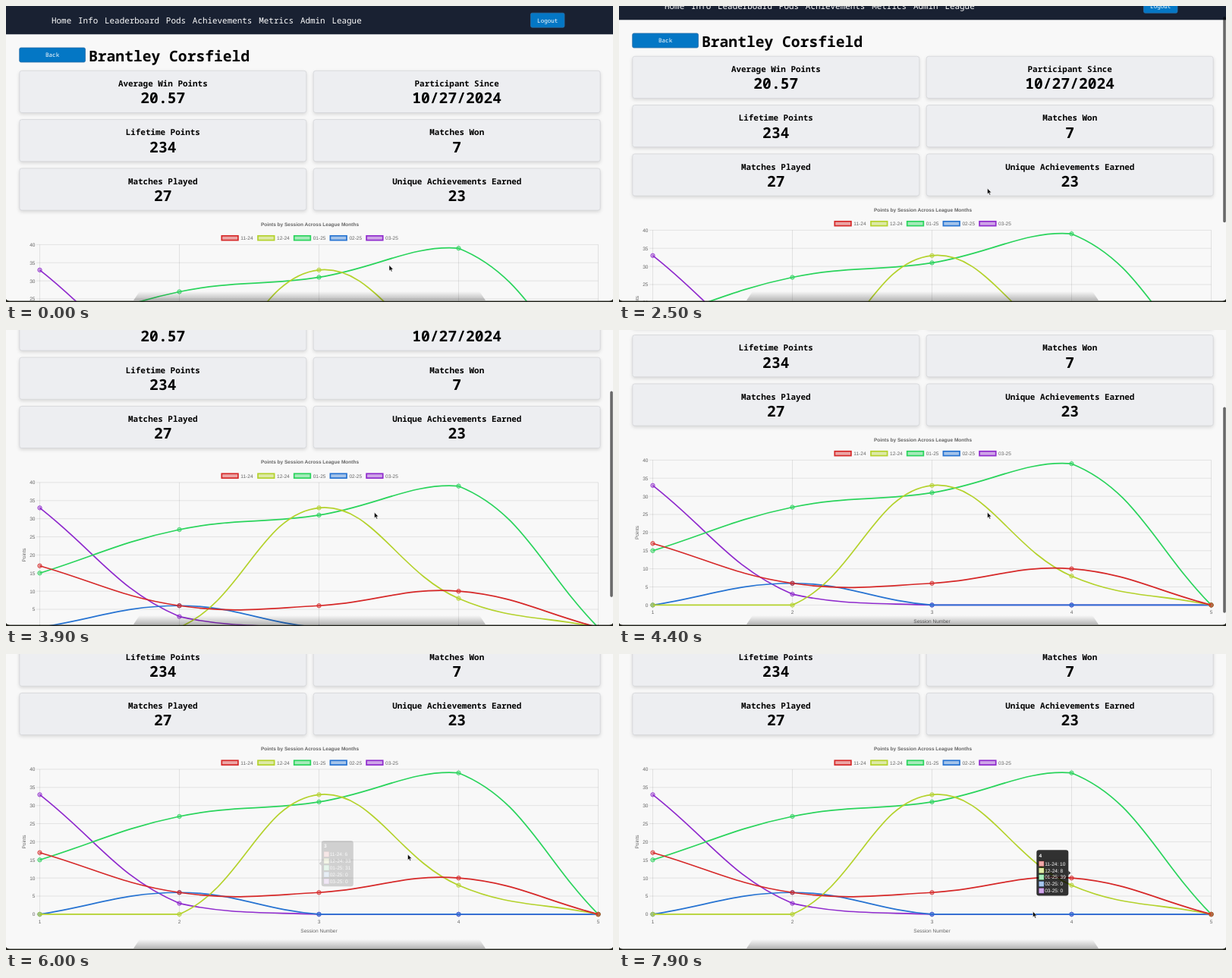
An HTML page for the animation above (8000 ms loop, 800x390 px).

```html
<!DOCTYPE html>
<html lang="en">
<head>
<meta charset="utf-8">
<title>Participant stats</title>
<style>
html, body { margin: 0; width: 100%; height: 100%; overflow: hidden; background: #f8f8f8; }
svg { display: block; }
text { text-rendering: geometricPrecision; white-space: pre; }
.mono { font-family: "Noto Sans Mono", "DejaVu Sans Mono", monospace; }
.sans { font-family: "Liberation Sans", Arial, sans-serif; font-size: 6.55px; fill: #666; }
.card { fill: #edeef1; stroke: #d3d5d8; stroke-width: .8; filter: drop-shadow(0 2px 2px rgba(0,0,0,.13)); }
.button { fill: #0477c5; stroke: #2b6fa8; stroke-width: .8; }
</style>
</head>
<body>
<svg width="800" height="390" viewBox="0 0 800 390">
  <defs>
    <linearGradient id="shade" x2="0" y2="1">
      <stop offset="0" stop-opacity="0"/><stop offset="1" stop-opacity=".26"/>
    </linearGradient>
  </defs>
  <g id="page"></g>
  <rect id="bar" x="796.2" width="3.6" rx="1.8" fill="#000" opacity="0"/>
  <path d="M168 388L176 376H624L632 388Z" fill="url(#shade)"/>
  <path d="M0 386Q1 388.4 5 388.4H795Q799 388.4 800 386V390H0Z" fill="#25261f"/>
  <path id="cursor" d="M0 0V7.4L1.7 5.9 2.9 8.6 4.1 8.1 3 5.5H5.3Z" fill="#000" stroke="#fff" stroke-width=".5"/>
</svg>
<script>
const $ = id => document.getElementById(id);
const page = $('page');
const LOOP = 8000, STEP = 100, MAX_SCROLL = 162.5;

function add(parent, tag, attrs, content) {
  const el = document.createElementNS('http://www.w3.org/2000/svg', tag);
  for (const key in attrs) el.setAttribute(key, attrs[key]);
  if (content !== undefined) el.textContent = content;
  parent.append(el);
  return el;
}
// Both text helpers take the vertical centre of the line.
const mono = (x, y, size, str, more) => add(page, 'text',
  { class: 'mono', x, y: y + size * .357, 'font-size': size, ...more }, str);
const sans = (parent, x, y, str, more) => add(parent, 'text',
  { class: 'sans', x, y: y + 2.35, ...more }, str);
const middle = { 'text-anchor': 'middle' };
const end = { 'text-anchor': 'end' };
const bold = { 'font-weight': 700 };

// Navigation and heading
add(page, 'rect', { width: 800, height: 37.3, fill: '#192132' });
let navX = 60;
for (const item of 'Home Info Leaderboard Pods Achievements Metrics Admin League'.split(' ')) {
  mono(navX, 19, 10.92, item, { fill: '#fff', 'font-weight': 500 });
  navX += item.length * 6.55 + 8.8;
}
function button(x, y, width, label) {
  add(page, 'rect', { class: 'button', x, y, width, height: 19, rx: 2 });
  mono(x + width / 2, y + 9.6, 7.6, label, { ...middle, fill: '#fff', 'font-weight': 500 });
}
button(691.5, 9.2, 44.5, 'Logout');
button(17.7, 55, 86.8, 'Back');
mono(109, 66, 19.65, 'Brantley Corsfield', bold);

// Stat cards
[['Average Win Points', '20.57'], ['Participant Since', '10/27/2024'],
 ['Lifetime Points', '234'], ['Matches Won', '7'],
 ['Matches Played', '27'], ['Unique Achievements Earned', '23']].forEach(([label, value], i) => {
  const x = 17.8 + i % 2 * 387.4, y = 85.3 + (i >> 1) * 64.3;
  add(page, 'rect', { class: 'card', x, y, width: 378, height: 55.2, rx: 3 });
  mono(x + 189, y + 17, 10.92, label, { ...middle, ...bold });
  mono(x + 189, y + 35.9, 19.65, value, { ...middle, ...bold });
});

// Chart
const series = [
  { name: '11-24', color: '#d62828', data: [17, 6, 6, 10, 0] },
  { name: '12-24', color: '#b4d22c', data: [0, 0, 33, 8, 0] },
  { name: '01-25', color: '#2ad45c', data: [15, 27, 31, 39, 0] },
  { name: '02-25', color: '#2673d2', data: [0, 6, 0, 0, 0] },
  { name: '03-25', color: '#8f2acd', data: [33, 3, 0, 0, 0] }
];
const px = i => 44.5 + 184 * i;
const py = v => 505.4 - 4.775 * v;

sans(page, 400.5, 287.4, 'Points by Session Across League Months', { ...middle, ...bold, style: 'font-size:6.5px' });
series.forEach(({ name, color }, i) => {
  const x = 284.3 + 47.7 * i;
  add(page, 'rect', { x, y: 302.8, width: 21.6, height: 5.8, fill: color, 'fill-opacity': .4, stroke: color, 'stroke-width': 1.7 });
  sans(page, x + 25, 305.7, name);
});
let grid = '';
for (let v = 0; v <= 40; v += 5) {
  grid += `M40 ${py(v)}H780.5`;
  sans(page, 38.5, py(v), v, end);
}
for (let i = 0; i < 5; i++) {
  grid += `M${px(i)} ${py(40)}V510`;
  sans(page, px(i), 515, i + 1, middle);
}
add(page, 'path', { d: grid, stroke: '#000', 'stroke-opacity': .13, 'stroke-width': .7 });
sans(page, 412.5, 527, 'Session Number', middle);
sans(page, 0, 0, 'Points', { ...middle, transform: 'translate(23.5 410) rotate(-90)' });

// Distance-weighted spline, control points kept inside the plot
function curve(data) {
  const pts = data.map((v, i) => [px(i), py(v)]);
  const dist = (a, b) => Math.hypot(a[0] - b[0], a[1] - b[1]);
  const inside = y => Math.min(py(0), Math.max(py(40), y));
  const handles = pts.map((p, i) => {
    const a = pts[i - 1] || p, b = pts[i + 1] || p;
    const da = dist(a, p), db = dist(p, b);
    const at = k => [p[0] + k * (b[0] - a[0]), inside(p[1] + k * (b[1] - a[1]))];
    return [at(-.4 * da / (da + db)), at(.4 * db / (da + db))];
  });
  return pts.map((p, i) => i ? `C${handles[i - 1][1]} ${handles[i][0]} ${p}` : `M${p}`).join('');
}
for (const { color, data } of [...series].reverse()) {
  add(page, 'path', { d: curve(data), fill: 'none', stroke: color, 'stroke-width': 1.7 });
  data.forEach((v, i) => add(page, 'circle',
    { cx: px(i), cy: py(v), r: 2.7, fill: color, 'fill-opacity': .4, stroke: color, 'stroke-width': .8 }));
}

// Tooltip
const tip = add(page, 'g', { opacity: 0 });
add(tip, 'rect', { width: 42, height: 60.3, rx: 3.3, opacity: .8 });
const caret = add(tip, 'path', { opacity: .8 });
const white = { style: 'fill:#fff' };
const tipTitle = sans(tip, 3.3, 6.9, '', { ...white, ...bold });
const tipRows = series.map(({ color }, i) => {
  const y = 18 + 8.9 * i, box = { x: 3.3, y: y - 3.2, width: 6.4, height: 6.4 };
  add(tip, 'rect', { ...box, fill: '#fff' });
  add(tip, 'rect', { ...box, fill: color, 'fill-opacity': .4, stroke: color, 'stroke-opacity': .5, 'stroke-width': .5 });
  return sans(tip, 10.9, y, '', white);
});
function fillTip(index) {
  tipTitle.textContent = index + 1;
  series.forEach((s, i) => tipRows[i].textContent = `${s.name}: ${s.data[index]}`);
  caret.setAttribute('d', index < 3 ? 'M0 27.2L-3 30.2 0 33.2Z' : 'M42 27.2L45 30.2 42 33.2Z');
}

// Keyframes: [time, value], linear in between
function track(keys, t) {
  const n = keys.findIndex(k => k[0] > t);
  if (n === 0) return keys[0][1];
  if (n < 0) return keys[keys.length - 1][1];
  const [t0, a] = keys[n - 1], [t1, b] = keys[n];
  return a + (b - a) * (t - t0) / (t1 - t0);
}
const scrollKeys = [[1800, 0], [2200, 6], [2500, 19], [3100, 62], [3900, 113.5], [4400, 143], [4700, 156], [5000, MAX_SCROLL]];
const cursorX = [[500, 505], [1800, 485.5], [5800, 485.5], [6000, 529.5], [6400, 541], [7200, 545.5]];
const cursorY = [[500, 341.5], [1800, 240.3], [5800, 240.3], [6000, 264], [6400, 295], [7200, 339.3]];
const barAlpha = [[1800, 0], [2000, .58], [5300, .58], [5600, 0]];
const tipAlpha = [[5900, 0], [6000, .2], [6100, .7], [6200, 1]];

function draw(now) {
  const t = Math.floor(now % LOOP / STEP) * STEP;
  const scroll = track(scrollKeys, t);
  page.setAttribute('transform', `translate(0 ${-scroll})`);

  const ratio = 390 / (390 + MAX_SCROLL), bar = $('bar');
  bar.setAttribute('y', scroll * ratio + .5);
  bar.setAttribute('height', 390 * ratio - 4);
  bar.setAttribute('opacity', track(barAlpha, t));

  $('cursor').setAttribute('transform', `translate(${track(cursorX, t)} ${track(cursorY, t)})`);

  const move = 1 - (1 - Math.min(1, Math.max(0, (t - 6000) / 400))) ** 4;
  fillTip(t > 6000 ? 3 : 2);
  tip.setAttribute('transform', `translate(${415.8 + 134.5 * move} ${408.4 + 12.4 * move})`);
  tip.setAttribute('opacity', track(tipAlpha, t));
  requestAnimationFrame(() => draw(performance.now()));
}
draw(0);
</script>
</body>
</html>
```
